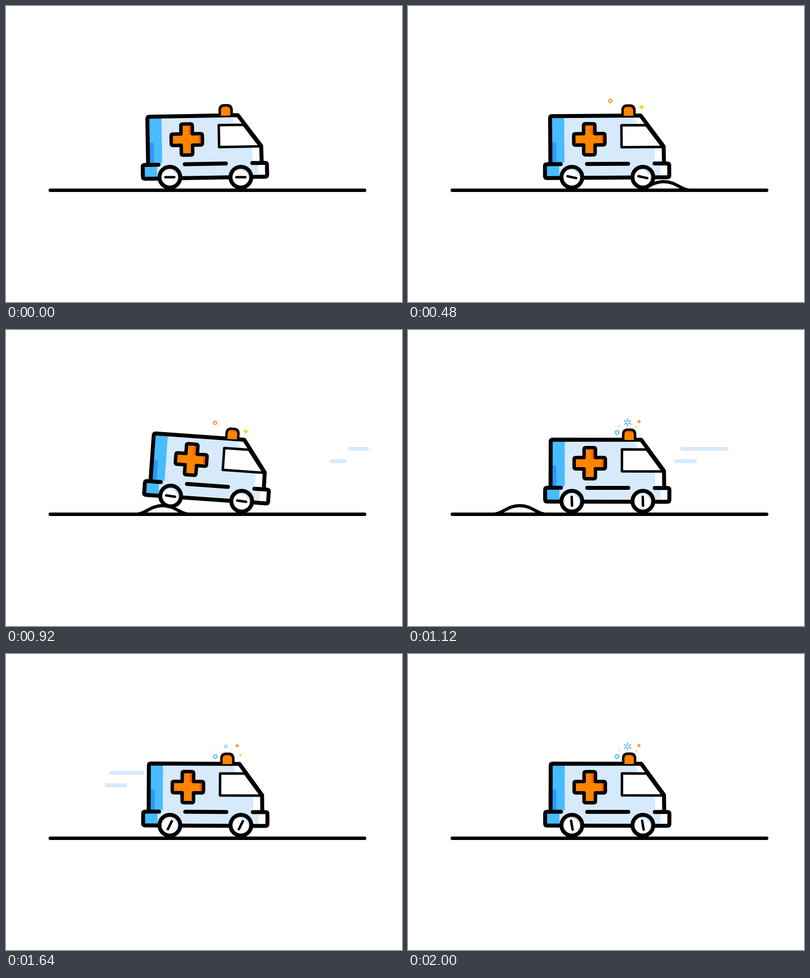
An HTML page for the animation above (2040 ms loop, 800 px wide and 600 px high).

```html
<!DOCTYPE html>
<html>
<head>
<meta charset="utf-8">
<title>Ambulance on a bumpy road</title>
<style>
html, body { margin: 0; width: 100%; height: 100%; overflow: hidden; background: #fff; }
svg { display: block; }
.ink { stroke: #000; stroke-linecap: round; stroke-linejoin: round; }
.wind { stroke: #d6eafc; stroke-width: 8; stroke-linecap: round; }
</style>
</head>
<body>
<svg width="800" height="600" viewBox="0 0 800 600" fill="none">
  <defs>
    <linearGradient id="shade">
      <stop offset="0" stop-color="#ff8500"/>
      <stop offset=".35" stop-color="#ff7a00"/>
      <stop offset="1" stop-color="#ff3d10"/>
    </linearGradient>
    <radialGradient id="lamp" cx=".4" cy=".75" r=".8">
      <stop offset=".6" stop-color="#ff8500"/>
      <stop offset="1" stop-color="#ff3d10"/>
    </radialGradient>
    <path id="star" d="M0-5Q1-1 5 0Q1 1 0 5Q-1 1-5 0Q-1-1 0-5"/>
    <g id="tire">
      <circle r="21" fill="#fff"/>
      <path d="M-11-13A17 17 0 0 1 15 8A19 19 0 0 0-11-13" fill="#c8e4fd"/>
      <circle class="ink" r="21" stroke-width="8"/>
    </g>
  </defs>

  <path id="wind0" class="wind"/>
  <path id="wind1" class="wind"/>
  <path class="ink" d="M89.5 373.5H724.5" stroke-width="7"/>
  <path id="bump" class="ink" stroke-width="6.5"
    d="M-59 373.5H-56C-34 373.5-26 356 0 356S34 373.5 56 373.5H59"/>

  <g id="van">
    <path d="M288 222.500H471L517 285V320H528V348H277V320H288Z" fill="#fff"/>
    <path d="M306 224H456L466 241L499 288V318H510.500V346H306Z" fill="#d6eafc"/>
    <path d="M291 225H316.500V317H306V345H280V322H291Z" fill="#48bcff"/>
    <path d="M291 275H296Q300 275 300 279V317H291Z" fill="#2d98fa"/>
    <path class="ink" d="M432 242H482L515 286.500L432 286.500Z" fill="#fff" stroke-width="5"/>
    <path class="ink" stroke-width="8" d="M288 319V227Q288 222.500 292 222.500H471L517 285.500L517.500 319
      M309 320H281Q277 320 277 324V344Q277 348 281 348H524Q528 348 528 344V324Q528 320 524 320H498.500
      M362 320H445"/>

    <g transform="translate(367 270)">
      <path id="cross" class="ink" fill="#ff8500" stroke-width="7"/>
      <path d="M0-28H8V-9H0Z" fill="url(#shade)"/>
      <path d="M21-8H28V8H21Z" fill="url(#shade)"/>
    </g>
    <path class="ink" style="stroke-linecap:butt" d="M434.500 223V212Q434.500 202 444 202H449Q458.500 202 458.500 212V223"
      fill="url(#lamp)" stroke-width="5"/>

    <g id="sparks">
      <path data-at="443.200 187.200" data-pulse="0 .27" stroke="#45a8fb" stroke-width="2" stroke-linecap="round" id="flake"/>
      <circle data-at="422 207.800" data-pulse="0 .33" r="3.800" stroke="#55bdf9" stroke-width="2.300"/>
      <use data-at="466.300 185.500" data-pulse=".12 .44" href="#star" fill="#ff9830"/>
      <circle data-at="426.500 195.300" data-pulse="-.03 .255" r="1.700" fill="#ffcf3a"/>
      <circle data-at="460.600 196.400" data-pulse="-.03 .255" r="1.700" fill="#ffcf3a"/>
      <circle data-at="409.800 192.500" data-pulse=".5 .345" data-late r="3.300" stroke="#ff8f1c" stroke-width="2.200"/>
      <g data-at="473 205.200" data-pulse=".5 .395" data-late><use href="#star" transform="scale(1.200)" fill="#ffd21f"/></g>
    </g>
  </g>

  <g id="rear"><use href="#tire"/><path class="ink" d="M-9 0H9" stroke-width="5"/></g>
  <g id="front"><use href="#tire"/><path class="ink" d="M-9 0H9" stroke-width="5"/></g>
</svg>
<script>
const LOOP = 2040, BEAT = 440;
const $ = id => document.getElementById(id);
const place = (el, value) => el.setAttribute('transform', value);
const clamp = v => Math.max(0, Math.min(1, v));

// Piecewise linear value through [time, value] pairs
function track(t, keys) {
  let value = keys[0][1];
  for (let i = 1; i < keys.length; i++) {
    const [t0, v0] = keys[i - 1], [t1, v1] = keys[i];
    if (t >= t0) value = v0 + (v1 - v0) * clamp((t - t0) / (t1 - t0));
  }
  return value;
}

$('cross').setAttribute('d',
  'M-11.500-28Q-11.500-31.500-8-31.500H8Q11.500-31.500 11.500-28V-11.500H28Q31.500-11.500 31.500-8V8Q31.500 11.500 28 11.500' +
  'H11.500V28Q11.500 31.500 8 31.500H-8Q-11.500 31.500-11.500 28V11.500H-28Q-31.500 11.500-31.500 8V-8Q-31.500-11.500-28-11.500H-11.500Z');

let flake = '';
for (let i = 0; i < 6; i++) {
  const a = Math.PI * (i / 3 + .5), x = Math.cos(a), y = Math.sin(a);
  flake += `M${x * 3} ${y * 3}L${x * 7.2} ${y * 7.2}`;
}
$('flake').setAttribute('d', flake);

const sparks = [...$('sparks').children].map(el => {
  const [peak, reach] = el.dataset.pulse.split(' ').map(Number);
  return { el, peak, reach, at: el.dataset.at, late: 'late' in el.dataset };
});

const winds = [
  { y: 241, head: [[873, 729], [920, 696], [1120, 555], [1640, 213], [1720, 160]],
    tail: [[1000, 729], [1120, 644], [1640, 276], [1804, 160]] },
  { y: 266, head: [[880, 684], [920, 659], [1120, 543], [1640, 204], [1726, 148]],
    tail: [[958, 684], [1120, 580], [1640, 241], [1783, 148]] }
];
const sway = [[0, -1], [240, -.45], [680, -.3], [1120, .1], [1640, .25], [2000, .1]];

// Height of a wheel while it rolls over the bump
const lift = dt => Math.abs(dt) < 130 ? 10.4 * Math.cos(Math.PI / 2 * dt / 130) ** 2 : 0;

function draw(t) {
  $('bump').style.display = t >= 38 && t < 1370 ? '' : 'none';
  place($('bump'), `translate(${717 - (t - 40) / 2.2} 0)`);

  winds.forEach(({ y, head, tail }, i) => {
    const a = track(t, head), b = track(t, tail);
    $('wind' + i).setAttribute('d', b - a > .1 ? `M${a} ${y}H${b}` : '');
  });

  const up = lift(t - 605), back = lift(t - 920);
  const tilt = Math.atan2(up - back, 143.5);
  const rise = (up + back) / 2;
  place($('van'), `translate(0 ${-rise}) rotate(${tilt * -180 / Math.PI + track(t, sway)} 403 370)`);

  const shift = -23 * Math.sin(tilt), spin = t * .4;
  [['rear', 331, back], ['front', 474.5, up]].forEach(([id, x, h]) => {
    place($(id), `translate(${x + shift} ${347 - h})`);
    place($(id).lastElementChild, `rotate(${spin})`);
  });

  const phase = (t - 240) / BEAT;
  for (const { el, peak, reach, at, late } of sparks) {
    const d = phase - peak, gap = Math.abs(d - Math.round(d));
    const size = t < (late ? 240 : 38) ? 0 : clamp((reach - gap) / .15);
    el.style.display = size ? '' : 'none';
    place(el, `translate(${at}) scale(${size})`);
  }
}

const start = performance.now();
function frame() {
  draw((performance.now() - start) % LOOP);
  requestAnimationFrame(frame);
}
frame();
</script>
</body>
</html>
```
